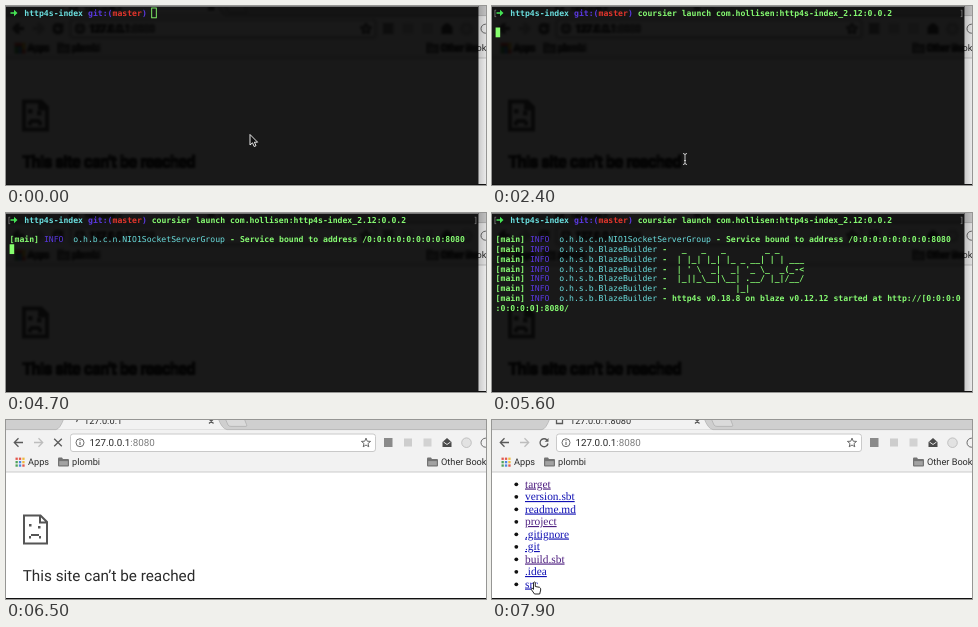
These frames come from a looping animation (480 by 179 pixels, 8000 ms). An HTML page:

```html
<!DOCTYPE html>
<html lang="en">
<head>
<meta charset="utf-8">
<title>Terminal and browser</title>
<style>
  html, body { margin: 0; width: 100%; height: 100%; overflow: hidden; background: #fff; }
  svg { display: block; width: 100vw; height: 100vh; }
  text { white-space: pre; text-rendering: geometricPrecision; }
  .ui { font-family: Roboto, "Open Sans", sans-serif; font-size: 9.2px; fill: #2b2b2b; }
  .serif { font-family: "Liberation Serif", serif; font-size: 11.4px; text-decoration: underline; }
  .mono { font: bold 8.14px "DejaVu Sans Mono", monospace; }
  .line { fill: none; stroke: #5a5a5a; stroke-width: 1.3; }
</style>
</head>
<body>
<svg viewBox="0 0 480 179" preserveAspectRatio="none">
  <defs>
    <clipPath id="window"><rect width="472" height="179"/></clipPath>
    <filter id="smear" x="-5%" y="-5%" width="110%" height="110%" color-interpolation-filters="sRGB">
      <feMorphology operator="erode" radius="1"/>
      <feGaussianBlur stdDeviation="1"/>
    </filter>
    <linearGradient id="shadow">
      <stop offset="0" stop-opacity=".22"/>
      <stop offset="1" stop-opacity=".08"/>
    </linearGradient>
    <g id="folder">
      <path d="M0 1.2Q0 0 1 0H4L5 1.4H10Q11 1.4 11 2.4V8Q11 9 10 9H1Q0 9 0 8Z" fill="#737373"/>
      <path d="M1.2 3.6H9.8V7.8H1.2Z" fill="#a2a2a2"/>
    </g>
  </defs>

  <g id="browser">
    <rect x="-10" y="-10" width="500" height="200" fill="#fff"/>
    <rect x="-10" y="-10" width="500" height="20" fill="#cfcfcf"/>
    <path d="M-10 10H490V52H-10Z" fill="#f2f2f2"/>
    <path d="M-10 9.6H50Q54 9 58 -2H212Q216 9 221 9.6H490" fill="#f2f2f2" stroke="#b4b4b4" stroke-width=".8"/>
    <path d="M219 -2L222 5Q223 6.4 225 6.4H240Q241.5 6.4 240.5 4.5L238 -2Z" fill="#dadada" stroke="#b0b0b0" stroke-width=".8"/>
    <path d="M-10 52H490" stroke="#c6c6c6" stroke-width=".9"/>
    <path id="doc" d="M64.5 -4H70.5V3.5H64.5Z" class="line"/>
    <path id="spinner" d="M64.5 -1A3.5 3.5 0 0 1 71.5 -1" class="line"/>
    <text id="tab" class="ui" x="78" y="4"></text>
    <path d="M203 -1L207.5 3.5M207.5 -1L203 3.5" class="line"/>

    <path d="M17 22.5H8.5M12.5 18.3L8.3 22.5L12.5 26.7" class="line"/>
    <path d="M28 22.5H36.5M32.5 18.3L36.7 22.5L32.5 26.7" class="line" style="stroke:#bdbdbd"/>
    <g id="reload">
      <path d="M55 20A4 4 0 1 0 56 23.5" class="line"/>
      <path d="M56.5 18V21.8H52.7Z" fill="#5a5a5a"/>
    </g>
    <path id="stop" d="M48.2 18.7L55.8 26.3M55.8 18.7L48.2 26.3" class="line"/>
    <rect x="64.5" y="14" width="305" height="17.5" rx="2.5" fill="#fff" stroke="#c4c4c4" stroke-width=".9"/>
    <circle cx="74" cy="22.7" r="4" class="line" style="stroke-width:.9"/>
    <path d="M74 22V25M74 20.2V21.2" class="line" style="stroke-width:1"/>
    <text class="ui" x="83.5" y="26.3" style="font-size:9.8px">127.0.0.1<tspan fill="#7d7d7d">:8080</tspan></text>
    <path id="star" class="line" style="stroke-width:.9"/>

    <rect x="378" y="18" width="8.5" height="9" fill="#8a8a8a"/>
    <rect x="398" y="18.5" width="8" height="8" fill="#cdcdcd"/>
    <rect x="417.5" y="18.5" width="8" height="8" fill="#d2d2d2"/>
    <path d="M436.5 22L441 18L445.5 22V27H436.5Z" fill="#4a4a4a"/>
    <path d="M437.5 22L441 24.5L444.5 22" fill="none" stroke="#f2f2f2" stroke-width=".9"/>
    <circle cx="460.5" cy="22.7" r="4.8" fill="#e2e2e2" stroke="#b5b5b5" stroke-width=".8"/>
    <circle cx="479.5" cy="22.7" r="4.5" class="line" style="stroke-width:.9"/>

    <g id="apps"></g>
    <text class="ui" x="22" y="45.4">Apps</text>
    <use href="#folder" x="52" y="37.5"/>
    <text class="ui" x="66" y="45.4">plombi</text>
    <use href="#folder" x="421" y="37.5"/>
    <text class="ui" x="435" y="45.4">Other Bookmarks</text>

    <g id="error">
      <path d="M18 95.5H34.5L41 102V123.5H18ZM34 95.5V102.5H41" fill="none" stroke="#555" stroke-width="2"/>
      <path d="M23 104H25.5V106.5H23ZM32 106H34.5V108.5H32ZM25 114H33V116H25ZM23 116H25V118.5H23ZM33 116H35V118.5H33Z" fill="#555"/>
      <text class="ui" x="16.7" y="161.3" style="font-size:15.3px">This site can’t be reached</text>
    </g>
    <g id="files"></g>
  </g>

  <g id="terminal">
    <rect x="472" width="8" height="179" fill="url(#shadow)"/>
    <rect x="472" width="1" height="179" opacity=".4"/>
    <g clip-path="url(#window)">
      <use href="#browser" filter="url(#smear)"/>
      <rect width="472" height="179" opacity=".9"/>
      <path d="M0 .5H472" stroke="#777"/>
    </g>
    <path d="M4.5 6.2H8V3.8L11.5 7L8 10.2V7.8H4.5Z" fill="#45e455"/>
    <g id="screen"></g>
    <g id="marks"></g>
    <rect id="caret" width="4.6" height="9.8" stroke="#86ff6e"/>
  </g>

  <path d="M0 178.5H480" stroke="#111"/>

  <g id="pointer">
    <path id="arrow" d="M-2 -5.5V5L.5 2.8L2.2 6.5L4 5.7L2.4 2.2H5.6Z" fill="#111" stroke="#fff" stroke-width=".9"/>
    <path id="beam" d="M-2 -5.5Q0 -5.5 0 -4Q0 -5.5 2 -5.5M0 -4V4M-2 5.5Q0 5.5 0 4Q0 5.5 2 5.5M-1 1.5H1" fill="none" stroke="#c8c8c8"/>
    <path id="hand" d="M-2.5 -5.5Q-1.5 -6.5 -.7 -5.5V-1.5L3.5 -.7Q5 0 4.7 2L3.7 6H-1.5L-4.7 1.5Q-4.5 0 -3.3 .5L-2.5 1.3Z" fill="#fff" stroke="#111" stroke-width=".9"/>
  </g>
</svg>

<script>
const LOOP = 8000, STEP = 100;
const COL = 4.9, ROW = 9.75, LEFT = 3.6, BASE = 9.8;
const BLUE = '#5a38e0', CYAN = '#6adede', RED = '#e2352c', GREEN = '#86fb72';
const COMMAND = 'coursier launch com.hollisen:http4s-index_2.12:0.0.2';
const BANNER = [
  '  _   _   _        _ _',
  ' | |_| |_| |_ _ __| | | ___',
  " | ' \\  _|  _| '_ \\_  _(_-<",
  ' |_||_\\__|\\__| .__/ |_|/__/',
  '             |_|'
];
const FILES = ['target', 'version.sbt', 'readme.md', 'project', '.gitignore', '.git', 'build.sbt', '.idea', 'src'];
const VISITED = ['target', 'project', 'build.sbt'];

const $ = id => document.getElementById(id);
const toggle = (node, on) => { node.style.display = on ? '' : 'none'; };
const show = (id, on) => toggle($(id), on);

function add(parent, tag, attrs, text = '') {
  const node = document.createElementNS('http://www.w3.org/2000/svg', tag);
  for (const key in attrs) node.setAttribute(key, attrs[key]);
  node.textContent = text;
  return $(parent).appendChild(node);
}

function print(col, row, text, fill = GREEN, weight = 'bold', parent = 'screen') {
  const style = `fill:${fill};font-weight:${weight}`;
  return add(parent, 'text', { class: 'mono', x: LEFT + col * COL, y: BASE + row * ROW, style }, text);
}

function logLine(row, logger, message) {
  return [
    print(0, row, '[main]'),
    print(7, row, 'INFO', BLUE, 'normal'),
    print(13, row, logger, CYAN, 'normal'),
    print(14 + logger.length, row, '- ' + message)
  ];
}

// Static parts
print(3, 0, 'http4s-index', CYAN);
print(16, 0, 'git:(', BLUE);
print(21, 0, 'master', RED);
print(27, 0, ')', BLUE);
const typed = print(29, 0, '');
const bound = logLine(2, 'o.h.b.c.n.NIO1SocketServerGroup', 'Service bound to address /0:0:0:0:0:0:0:0:8080');
const BUILDER = 'o.h.s.b.BlazeBuilder';
const started = [
  ...BANNER.flatMap((art, i) => logLine(3 + i, BUILDER, art)),
  ...logLine(8, BUILDER, 'http4s v0.18.8 on blaze v0.12.12 started at http://[0:0:0:0'),
  print(0, 9, ':0:0:0:0]:8080/')
];
print(-0.6, 0, '[', '#8a8a8a', 'normal', 'marks');
print(94.6, 0, ']', '#8a8a8a', 'normal', 'marks');

const DOTS = ['#e2574c', '#e2574c', '#efb93d', '#4fa35c', '#4d86e0', '#efb93d', '#4fa35c', '#4d86e0', '#e2574c'];
DOTS.forEach((fill, i) =>
  add('apps', 'rect', { x: 9.5 + i % 3 * 3.4, y: 37.6 + Math.floor(i / 3) * 3.4, width: 2.3, height: 2.3, fill }));

FILES.forEach((name, i) => {
  const y = 67.5 + i * 12.5;
  add('files', 'circle', { cx: 24.3, cy: y - 3.2, r: 1.9, fill: '#111' });
  add('files', 'text', { class: 'serif', x: 33, y, fill: VISITED.includes(name) ? '#4f2080' : '#1212b4' }, name);
});

const star = Array.from({ length: 10 }, (_, i) => {
  const r = i % 2 ? 2.1 : 4.8, a = i * Math.PI / 5;
  return `${360 + r * Math.sin(a)} ${22.9 - r * Math.cos(a)}`;
});
$('star').setAttribute('d', `M${star.join('L')}Z`);

// Latest value whose time has come
const at = (steps, t) => steps.reduce((value, [time, next]) => t >= time ? next : value, steps[0][1]);

const TYPING = [
  [0, ''], [1100, 'c'], [1200, 'cl'], [1300, 'clea'], [1400, 'clear'], [1600, ''],
  [1900, 'c'], [2000, 'co'], [2100, 'cou'], [2200, COMMAND]
];
const CURSORS = [[0, 'arrow'], [400, 'beam'], [600, ''], [2400, 'beam'], [2700, ''], [7100, 'arrow'], [7700, 'hand']];
const PATH = [
  [100, 246, 134], [600, 193, 153], [2700, 193, 153], [7100, 193, 150],
  [7700, 66, 62], [7800, 58, 112], [7900, 44, 168]
];

function position(t) {
  const i = PATH.findIndex(p => p[0] > t);
  if (i === 0) return PATH[0].slice(1);
  if (i < 0) return PATH[PATH.length - 1].slice(1);
  const [t0, x0, y0] = PATH[i - 1], [t1, x1, y1] = PATH[i];
  const k = (t - t0) / (t1 - t0);
  return [x0 + (x1 - x0) * k, y0 + (y1 - y0) * k];
}

function render(ms) {
  const t = Math.floor(ms % LOOP / STEP) * STEP;
  const running = t >= 2300, listening = t >= 4700, done = t >= 4900;
  const loaded = t >= 6900, loading = t >= 6500 && !loaded;

  show('terminal', t < 5700);
  show('marks', running);
  const input = at(TYPING, t);
  typed.textContent = input;
  bound.forEach(node => toggle(node, listening));
  started.forEach(node => toggle(node, done));

  const caret = $('caret'), focused = t >= 400;
  const row = done ? 10 : listening ? 3 : running ? 2 : 0;
  caret.setAttribute('x', LEFT + (running ? 0 : 29 + input.length) * COL);
  caret.setAttribute('y', row * ROW + 2);
  caret.setAttribute('fill', focused ? '#86ff6e' : 'none');
  caret.setAttribute('stroke-width', focused ? 0 : 0.9);
  show('caret', t < 5000);

  show('error', !loaded);
  show('files', loaded);
  show('stop', loading);
  show('reload', !loading);
  show('spinner', loading);
  show('doc', !loading);
  $('spinner').setAttribute('transform', `rotate(${t >= 6600 ? 110 : 50} 68 -1)`);
  $('tab').textContent = loaded ? '127.0.0.1:8080' : '127.0.0.1';

  const kind = at(CURSORS, t);
  for (const id of ['arrow', 'beam', 'hand']) show(id, id === kind);
  $('pointer').setAttribute('transform', `translate(${position(t)})`);
}

const begin = performance.now();
function tick() {
  render(performance.now() - begin);
  requestAnimationFrame(tick);
}
tick();
</script>
</body>
</html>
```
